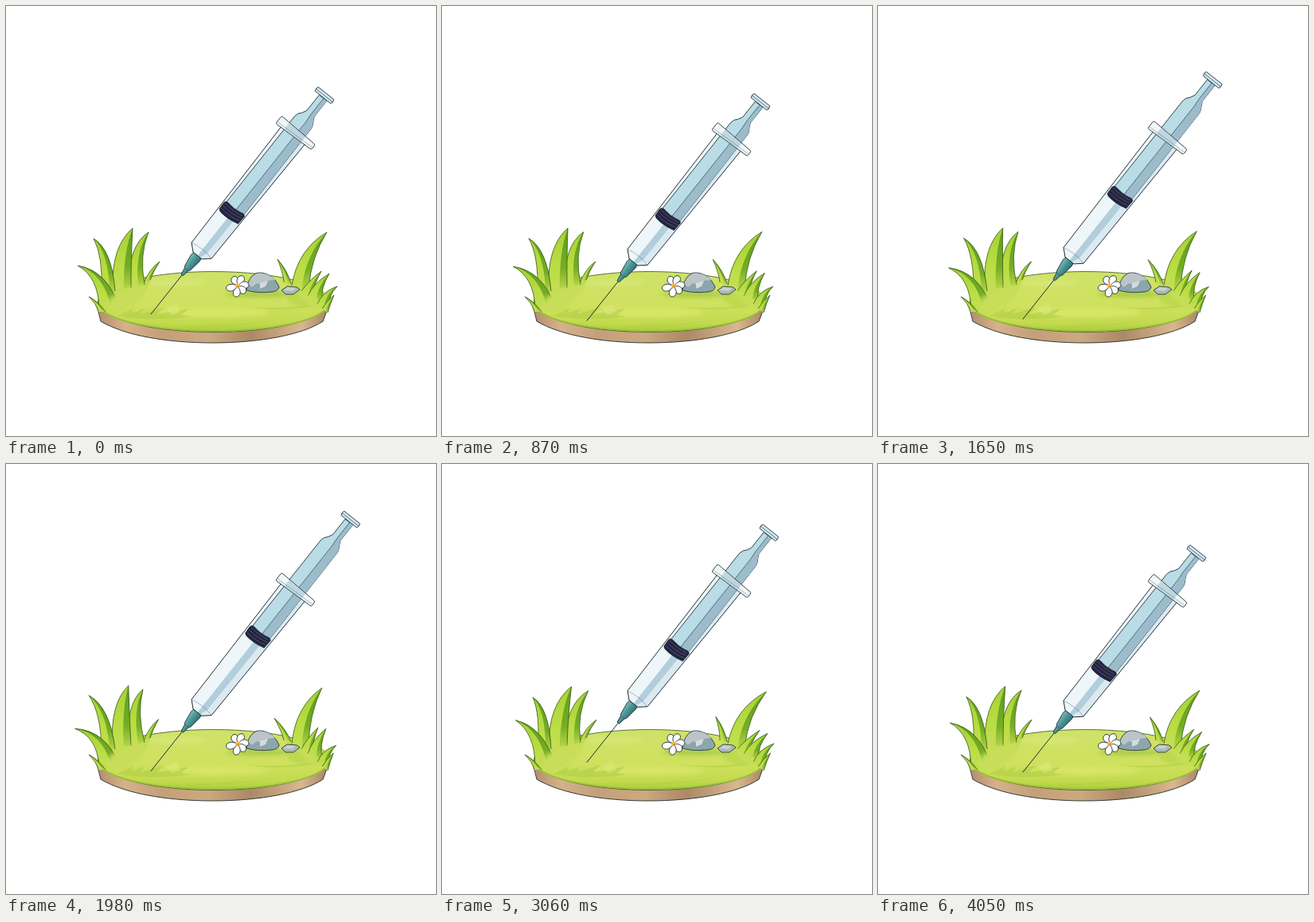
An HTML page that plays this animation: 540 by 540 pixels, repeating every 4500 ms.

```html
<!DOCTYPE html>
<html lang="en">
<head>
<meta charset="utf-8">
<title>Syringe on a meadow</title>
<style>
  html, body { margin: 0; width: 100%; height: 100%; overflow: hidden; background: #fff; }
  svg { display: block; width: 100vw; height: 100vh; }
  .line { fill: none; stroke: #1d2a30; stroke-width: .9; stroke-linejoin: round; stroke-linecap: round; }
  .thin { fill: none; stroke: #35535f; stroke-width: .7; }
  .edge { stroke: #1d2a30; stroke-width: .8; stroke-linejoin: round; }
  .rim { fill: none; stroke: #35551a; stroke-width: .8; stroke-linejoin: round; }
</style>
</head>
<body>
<svg viewBox="0 0 540 540">
  <defs>
    <linearGradient id="soil">
      <stop offset="0" stop-color="#b18c6b"/><stop offset=".12" stop-color="#d6b28b"/>
      <stop offset=".28" stop-color="#c4a07a"/><stop offset=".48" stop-color="#cca981"/>
      <stop offset=".66" stop-color="#ab8966"/><stop offset=".88" stop-color="#d9b78f"/>
      <stop offset="1" stop-color="#a5825f"/>
    </linearGradient>
    <linearGradient id="turf" x2="0" y2="1">
      <stop offset="0" stop-color="#cfe269"/><stop offset=".55" stop-color="#cfe15e"/>
      <stop offset=".85" stop-color="#c3da4e"/><stop offset="1" stop-color="#a9cc3b"/>
    </linearGradient>
    <linearGradient id="blade" x2="0" y2="1">
      <stop offset="0" stop-color="#a5d035"/><stop offset=".6" stop-color="#b9dd42"/>
      <stop offset="1" stop-color="#c5de55"/>
    </linearGradient>
    <linearGradient id="shade" x2="0" y2="1">
      <stop offset="0" stop-color="#5f9d1e"/><stop offset=".65" stop-color="#74ad25"/>
      <stop offset="1" stop-color="#b4d546"/>
    </linearGradient>
    <linearGradient id="hub" x2="0" y2="1">
      <stop offset="0" stop-color="#7cbcba"/><stop offset=".45" stop-color="#4d9997"/>
      <stop offset="1" stop-color="#2f7376"/>
    </linearGradient>
    <filter id="soft" x="-30%" y="-60%" width="160%" height="220%"><feGaussianBlur stdDeviation="2.5"/></filter>
  </defs>

  <g id="platform">
    <path fill="url(#soil)" d="M114 372L119 396C150 414 202 423 260 423C318 423 372 413 398 396L406 374Z"/>
    <path class="line" d="M114 376L119 396C150 414 202 423 260 423C318 423 372 413 398 396L405 377"/>
    <ellipse class="rim" style="fill: url(#turf)" cx="260.5" cy="371.5" rx="145" ry="38"/>
    <path fill="none" stroke="#9ac23a" stroke-width="2" d="M117 379C137 400 205 408 260 408C330 408 390 397 404 378"/>
    <g filter="url(#soft)">
      <ellipse cx="377" cy="366" rx="24" ry="12" fill="#bdd94d"/>
      <ellipse cx="318" cy="362" rx="42" ry="4" fill="#adcc4a"/>
      <ellipse cx="215" cy="347" rx="38" ry="5" fill="#d6e673"/>
      <ellipse cx="260" cy="385" rx="70" ry="6" fill="#d7e567"/>
    </g>
    <path fill="#b1cf48" opacity=".6" d="M140 389L160 379L157 386L174 380L169 387L199 378L190 387L230 380L220 388L232 390Q180 397 140 389Z"/>
    <path fill="#dce87d" d="M200 379L215 374L219 384L208 388Z" opacity=".6"/>
    <path fill="#b1cf48" opacity=".5" d="M205 404Q280 405 350 394Q290 400 205 404ZM300 378Q350 381 394 374Q360 386 300 378Z"/>
  </g>

  <g id="grass"></g>
  <g filter="url(#soft)" fill="#c8de5a">
    <path d="M126 382L131 367Q150 352 178 351Q176 366 147 384Z"/>
    <path d="M364 356Q380 361 394 379Q378 378 364 356Z"/>
  </g>

  <g id="stones">
    <path class="edge" fill="#8ba6ad" d="M302 357C303 346 308 337 316 335C328 334 338 341 343 353Q342 358 334 359Q315 361 302 357Z"/>
    <path fill="#bcc4c8" d="M304 349C307 341 312 336 317 335.500C326 335 334 339 338 344L328 345L324 352L315 348L309 353Z"/>
    <path fill="#d6dcdd" d="M319 348L329 345L326 352L319 355Z"/>
    <path class="edge" fill="#aab9bb" d="M346 357L353 352L365 353L369 356L361 362L351 362Z"/>
    <path fill="#c8d0cf" d="M349 357L354 353L364 354L360 358Z"/>
  </g>
  <g id="flower" transform="translate(291 351.500)"></g>

  <g id="syringe">
    <path class="line" d="M0 0H66"/>
    <path class="edge" fill="url(#hub)" d="M63 -1.500L72 -3L74 -4.500L90 -7L94 -6V6L90 6.500L74 4.500L72 3L63 1.500Z"/>
    <path class="thin" d="M72 -3V3"/>
    <path fill="#eef6fa" d="M94 -7L102 -16L288 -18.500V18.500L102 16L94 7Z"/>
    <path fill="#b2cedc" d="M94 0L104 0L288 0V10L104 8L94 4Z"/>
    <path fill="#dbeaf1" d="M94 4L103 8L288 10V18.500L102 16L94 7Z"/>
    <path class="thin" d="M102 -16Q106 0 102 16" opacity=".5"/>

    <g id="plunger">
      <path class="edge" fill="#b9dce6" d="M166 -13.500L307 -13.500Q313 -13 316 -9L322 -6H347V6H322L316 9Q312 12 308 12.500L166 13.500Z"/>
      <path fill="#9cbccb" d="M166 2L310 2L322 1H347V6H322L316 9Q312 12 308 12.500L166 13.500Z"/>
      <path class="thin" d="M168 2L310 2L322 1H347"/>
      <path class="edge" fill="#d2e7ee" d="M347.500 -13Q351 -15 354 -13V12Q350 14 347.500 12Z"/>
      <path class="thin" d="M350.500 -13.500V12.500"/>
      <path class="edge" fill="#23233f" d="M155 -12Q153 0 157 15L169 15.500Q172 13 170 9Q168 0 170 -12Q169 -16 166 -15.500L157 -15Z"/>
      <path fill="none" stroke="#57587c" stroke-width=".8" d="M159 -14Q157 0 161 14M163 -14Q161 0 165 14M167 -14Q165 0 168 13"/>
    </g>

    <path class="line" d="M94 -7L102 -16L288 -18.500M94 -7V7L102 16L288 18.500"/>
    <g id="flange">
      <path class="edge" fill="#eef6f9" fill-opacity=".87" d="M287 -26.500Q285 -26.500 285 -24.500L287 27Q287 29 289 29H293Q295 29 295 27L297 -24.500Q297 -26.500 295 -26.500Z"/>
      <path fill="#aac7d2" opacity=".65" d="M286 -13H296L295 13H287Z"/>
      <path class="thin" d="M288 -26L290 28" opacity=".5"/>
    </g>
  </g>
</svg>
<script>
const NS = "http://www.w3.org/2000/svg";
const LOOP = 4500, MOTION_END = 4050, STEP = 30;
const byId = id => document.getElementById(id);

function add(parent, name, attrs) {
  const node = document.createElementNS(NS, name);
  for (const key in attrs) node.setAttribute(key, attrs[key]);
  return parent.appendChild(node);
}

// Eases between [time, value] keys with smoothstep.
function track(keys, t) {
  const next = keys.findIndex(key => key[0] > t);
  if (next < 0) return keys[keys.length - 1][1];
  if (next === 0) return keys[0][1];
  const [t0, v0] = keys[next - 1], [t1, v1] = keys[next];
  const u = (t - t0) / (t1 - t0);
  return v0 + (v1 - v0) * u * u * (3 - 2 * u);
}

const lift = [[0, 0], [1250, 10.5], [2750, -14.5], [4050, 0]];
const pull = [[1030, 0], [2150, 56], [3595, 0]];
const wind = [[0, 0], [500, -3], [1320, 1], [1980, -7], [2700, 6], [3800, 1]];

// Each blade: two base points, tip, a bend point per side, tip shift per unit of wind.
const blades = [
  { a: [172, 350], b: [181, 344], tip: [193, 321], bends: [[180, 330], [185, 333]], sway: [.2, .05] },
  { a: [154, 354], b: [174, 350], tip: [179, 284], bends: [[153, 301], [167, 313]], sway: [1, .15] },
  { a: [134, 356], b: [157, 354], tip: [159, 279], bends: [[132, 302], [157, 313]], sway: [.75, .1] },
  { a: [120, 360], b: [137, 358], tip: [110, 292], bends: [[122, 314], [133, 306]], sway: [.85, .2] },
  { a: [117, 380], b: [142, 378], tip: [90, 326], bends: [[116, 340], [127, 332]], sway: [.5, -.9] },
  { a: [116, 383], b: [125, 384], tip: [104, 365], bends: [[113, 373], [116, 371]], sway: [0, 0] },
  { a: [349, 347], b: [358, 349], tip: [341, 318], bends: [[348, 335], [354, 333]], sway: [.6, -.15] },
  { a: [359, 351], b: [380, 355], tip: [403, 284], bends: [[366, 306], [383, 316]], sway: [.9, .4] },
  { a: [371, 358], b: [386, 362], tip: [396, 333], bends: [[379, 346], [386, 350]], sway: [.6, .3] },
  { a: [379, 364], b: [397, 370], tip: [406, 336], bends: [[386, 348], [395, 354]], sway: [.6, .5] },
  { a: [391, 374], b: [405, 380], tip: [416, 352], bends: [[398, 358], [405, 362]], sway: [.2, -.2] },
  { a: [397, 380], b: [404, 385], tip: [412, 363], bends: [[402, 371], [407, 374]], sway: [.1, 0] }
];

const grass = byId("grass");
add(grass, "path", { fill: "#c3dd50", d: "M116 384L119 352Q150 341 183 342Q174 365 143 382ZM348 346Q374 343 405 381Q385 378 372 363Z" });
for (const blade of blades) {
  blade.body = add(grass, "path", { fill: "url(#blade)" });
  blade.dark = add(grass, "path", { fill: "url(#shade)" });
  blade.rim = add(grass, "path", { class: "rim" });
}

const flower = byId("flower");
for (const [angle, length] of [[-113, 13], [-60, 14], [-3, 14], [45, 13], [103, 14], [170, 15]])
  add(flower, "path", {
    class: "edge", fill: "#fff", transform: `rotate(${angle})`,
    d: `M1 0C4 -6 ${length - 2} -7 ${length} -1C${length} 5 5 5 1 0Z`
  });
add(flower, "circle", { r: 3, fill: "#f2bd50" });
add(flower, "circle", { cx: .5, cy: .8, r: 1.5, fill: "#d68d38" });

function bend(blade, gust) {
  const shift = (point, part) => point.map((c, i) => c + blade.sway[i] * gust * part);
  const tip = shift(blade.tip, 1);
  const [left, right] = blade.bends.map(point => shift(point, .4));
  const mid = blade.a.map((c, i) => c * .4 + blade.b[i] * .6);
  const inner = left.map((c, i) => c * .38 + right[i] * .62);
  const sides = `M${blade.a}Q${left} ${tip}Q${right} ${blade.b}`;
  blade.body.setAttribute("d", sides + "Z");
  blade.dark.setAttribute("d", `M${mid}Q${inner} ${tip}Q${right} ${blade.b}Z`);
  blade.rim.setAttribute("d", sides);
}

function draw(t) {
  const gust = track(wind, t);
  blades.forEach(blade => bend(blade, gust));
  byId("syringe").setAttribute("transform", `translate(182 ${387 + track(lift, t)}) rotate(-51.5)`);
  byId("plunger").setAttribute("transform", `translate(${track(pull, t)} 0)`);
}

const start = performance.now();
function tick() {
  const t = (performance.now() - start) % LOOP;
  draw(Math.min(MOTION_END, Math.floor(t / STEP) * STEP));
  requestAnimationFrame(tick);
}
tick();
</script>
</body>
</html>
```
